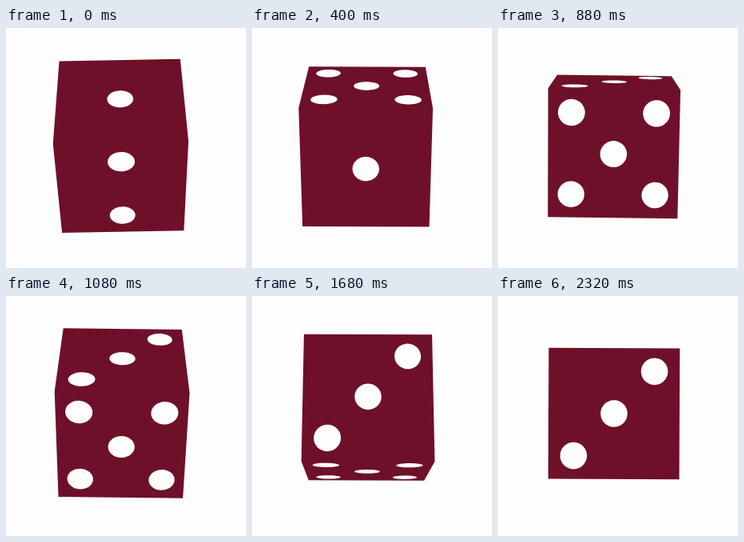
An HTML page with a canvas that plays this animation: 300 px wide and 300 px high, repeating every 2.36 s.

```html
<!DOCTYPE html>
<html lang="en">
<head>
<meta charset="utf-8">
<title>Rolling die</title>
<style>
  html, body { margin: 0; width: 100%; height: 100%; overflow: hidden; background: #fdfdfd; }
  canvas { display: block; }
</style>
</head>
<body>
<canvas id="stage" width="300" height="300"></canvas>
<script>
const ctx = document.getElementById('stage').getContext('2d');
const LOOP = 2360, STEP = 40;
const SIZE = 75.9, DEPTH = 13.6, FRONT = 82, MID_Y = 147, PIP = 0.205;

// time, spin left (deg), view offset y, view offset x, centre x, roll (deg)
const keys = [
  [40, 226.9, 0, -0.08, 143.7, -1.1],
  [400, 158.8, 0.47, -0.15, 142.3, 0.2],
  [720, 105, 0.82, 0, 144.1, 0.65],
  [1080, 58.6, 0.5, 0.03, 144.7, 0.7],
  [1400, 31, 0.5, 0.2, 145, 0.4],
  [1680, 15, 0.5, 0.18, 145, 0.2],
  [2320, 0, 0.5, 0.15, 145, 0.25]
];

// Each face follows the previous one by a quarter turn.
const faces = [
  [[0, 0], [0.615, -0.645], [-0.615, 0.645]],
  [[0, 0], [-0.645, -0.635], [0.645, -0.635], [-0.645, 0.635], [0.645, 0.635]],
  [[0, 0]],
  [[0, -0.6], [0, 0.6]]
];
const corners = [[-1, -1], [1, -1], [1, 1], [-1, 1]];
const rad = deg => deg * Math.PI / 180;

function chord(i, col) {
  const a = keys[i], b = keys[i + 1];
  return (b[col] - a[col]) / (b[0] - a[0]);
}

function slope(i, col) {
  if (i === 0) return chord(0, col);
  if (i === keys.length - 1) return 0;
  const before = keys[i][0] - keys[i - 1][0];
  const after = keys[i + 1][0] - keys[i][0];
  return (after * chord(i - 1, col) + before * chord(i, col)) / (before + after);
}

// Smooth cubic through the keys
function pose(t) {
  t = Math.max(t, keys[0][0]);
  let i = 0;
  while (i < keys.length - 2 && t >= keys[i + 1][0]) i++;
  const a = keys[i], b = keys[i + 1], span = b[0] - a[0];
  const k = Math.min(1, (t - a[0]) / span), k2 = k * k, k3 = k2 * k;
  return [1, 2, 3, 4, 5].map(c =>
    a[c] * (2 * k3 - 3 * k2 + 1) + b[c] * (3 * k2 - 2 * k3) +
    span * (slope(i, c) * (k3 - 2 * k2 + k) + slope(i + 1, c) * (k3 - k2)));
}

function projector(angle, [, offY, offX, midX, roll]) {
  const sin = Math.sin(angle), cos = Math.cos(angle);
  const rs = Math.sin(rad(roll)), rc = Math.cos(rad(roll));
  return ([u, v]) => {
    const scale = SIZE / (1 - (cos + v * sin) / DEPTH);
    const x = u * scale + (scale - FRONT) * offX;
    const y = (v * cos - sin) * scale + (scale - FRONT) * offY;
    return [midX + x * rc - y * rs, MID_Y + x * rs + y * rc];
  };
}

function facesViewer([a, b, , d]) {
  return (b[0] - a[0]) * (d[1] - a[1]) - (b[1] - a[1]) * (d[0] - a[0]) > 0;
}

function circle([u, v]) {
  return Array.from({ length: 48 }, (_, i) => {
    const a = i / 24 * Math.PI;
    return [u + PIP * Math.cos(a), v + PIP * Math.sin(a)];
  });
}

function fill(shapes, color) {
  ctx.beginPath();
  for (const points of shapes) {
    points.forEach(p => ctx.lineTo(...p));
    ctx.closePath();
    ctx.moveTo(0, 0);
  }
  ctx.fillStyle = color;
  ctx.fill();
}

function trace(shapes, color) {
  ctx.beginPath();
  for (const [first, ...rest] of shapes) {
    ctx.moveTo(...first);
    rest.forEach(p => ctx.lineTo(...p));
    ctx.closePath();
  }
  ctx.fillStyle = color;
  ctx.fill();
}

function draw(t) {
  const now = pose(t), sides = [], pips = [];
  faces.forEach((spots, i) => {
    const project = projector(rad(now[0] - 90 * i), now);
    const side = corners.map(project);
    if (!facesViewer(side)) return;
    sides.push(side);
    spots.forEach(s => pips.push(circle(s).map(project)));
  });
  ctx.fillStyle = '#fdfdfd';
  ctx.fillRect(0, 0, 300, 300);
  trace(sides, '#6e1029');
  trace(pips, '#fdfdfd');
}

const start = performance.now();
function tick() {
  const t = (performance.now() - start) % LOOP;
  draw(Math.floor(t / STEP) * STEP);
  requestAnimationFrame(tick);
}
tick();
</script>
</body>
</html>
```
